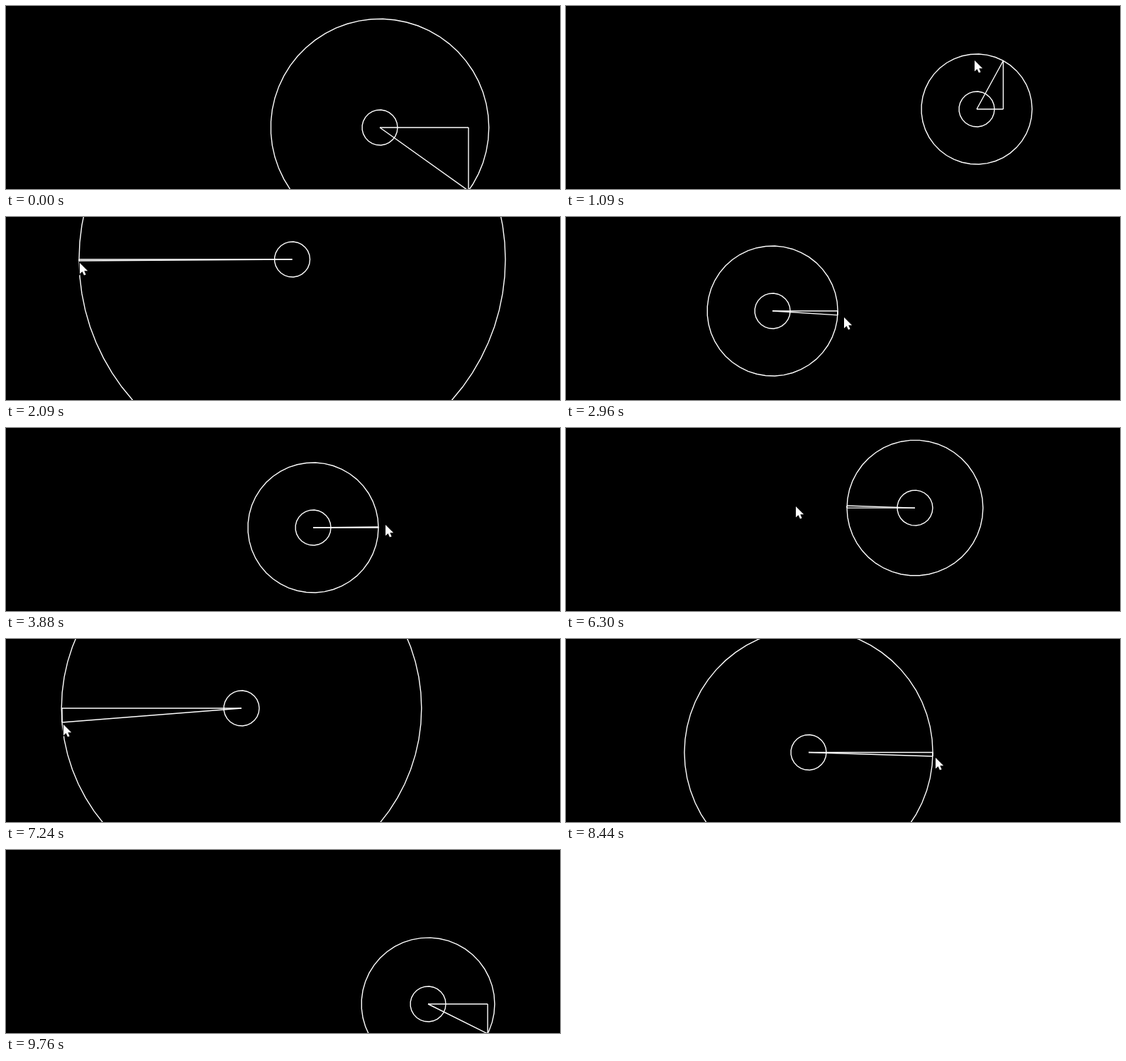
Animation, 781 px wide and 259 px high, one loop 9.82 s. Source, as an HTML page with a canvas:

```html
<!DOCTYPE html>
<html lang="en">
<head>
<meta charset="utf-8">
<title>Ball chasing the pointer</title>
<style>
  html, body { margin: 0; width: 100%; height: 100%; overflow: hidden; background: #000; }
  canvas { display: block; }
</style>
</head>
<body>
<canvas id="stage" width="781" height="259"></canvas>
<script>
const ctx = document.getElementById('stage').getContext('2d');
const LOOP = 9820;
const STEP = 78.3;   // the picture advances in even steps
const SHIFT = 45;

// Points the ball drifts through: step, x, y
const BALL = [
  [0, 527, 172], [8, 588, 171], [14, 579, 146], [27, 403.5, 60],
  [35, 297, 102], [39, 298, 139], [50, 433, 141], [58, 556, 92],
  [63, 574, 74], [68, 549, 82], [78, 514, 112], [87, 430, 107],
  [93, 332, 98], [100, 275, 108], [108, 342, 160.5], [125, 595, 218]
];

// Points where the hand rests between sweeps: step, x, y
const MOUSE = [
  [0, 652, 261.5], [3, 680, 262], [10, 700, 80], [27, 103, 62],
  [29, 103, 66], [39, 391, 141], [50, 525, 140], [57, 690, 70],
  [64, 399, 119], [72, 459, 157], [77, 570, 110], [87, 76, 110],
  [93, 79, 118], [95, 80, 122], [104, 471, 183], [108, 517, 166],
  [109, 520, 167], [116, 635, 163], [125, 679, 260]
];

// Cubic path through the rows: flow 1 glides through each point, flow 0 rests there.
function along(rows, n, flow) {
  const last = rows.length - 1;
  let i = 0;
  while (i < last - 1 && rows[i + 1][0] <= n) i++;
  const a = rows[i], b = rows[i + 1];
  const span = b[0] - a[0];
  const u = Math.min(1, (n - a[0]) / span);
  const slope = (k, c) => {
    const p = rows[Math.max(0, k - 1)], q = rows[Math.min(last, k + 1)];
    return flow * span * (q[c] - p[c]) / (q[0] - p[0]);
  };
  const at = c => {
    const d = b[c] - a[c], s = slope(i, c), e = slope(i + 1, c);
    return a[c] + u * (s + u * (3 * d - 2 * s - e + u * (s + e - 2 * d)));
  };
  return { x: at(1), y: at(2) };
}

const ballAt = n => along(BALL, n, 1);
const mouseAt = n => along(MOUSE, n, 0);

// Circles are polygons whose side count grows with the radius.
function ring(c, r) {
  const sides = Math.round(4 + 3 * Math.sqrt(2 * r));
  ctx.beginPath();
  for (let i = 0; i < sides; i++) {
    const a = i / sides * 2 * Math.PI;
    ctx.lineTo(c.x + r * Math.cos(a), c.y + r * Math.sin(a));
  }
  ctx.closePath();
  ctx.stroke();
}

function line(x1, y1, x2, y2) {
  ctx.beginPath();
  ctx.moveTo(x1, y1);
  ctx.lineTo(x2, y2);
  ctx.stroke();
}

const arrow = new Path2D('M0 0V15.5L3.6 12.2L6 17.5L8.6 16.4L6.3 11.2H11.2Z');

function pointer(p) {
  ctx.save();
  ctx.translate(Math.round(p.x) + 1, Math.round(p.y) + 1);
  ctx.lineWidth = 2;
  ctx.strokeStyle = '#000';
  ctx.stroke(arrow);
  ctx.fill(arrow);
  ctx.restore();
}

function draw(n) {
  const c = ballAt(n), m = mouseAt(n);
  ctx.fillStyle = '#000';
  ctx.fillRect(0, 0, 781, 259);
  ctx.fillStyle = ctx.strokeStyle = '#fff';
  ctx.lineWidth = 1.4;
  ring(c, 25);
  ring(c, Math.hypot(m.x - c.x, m.y - c.y));
  line(c.x, c.y, m.x, c.y);
  line(m.x, c.y, m.x, m.y);
  line(c.x, c.y, m.x, m.y);
  pointer(mouseAt(n + 1));   // the drawing lags the pointer by one step
}

const born = performance.now();
function tick() {
  const t = (performance.now() - born) % LOOP;
  draw(Math.floor((t + SHIFT) / STEP));
  requestAnimationFrame(tick);
}
tick();
</script>
</body>
</html>
```
